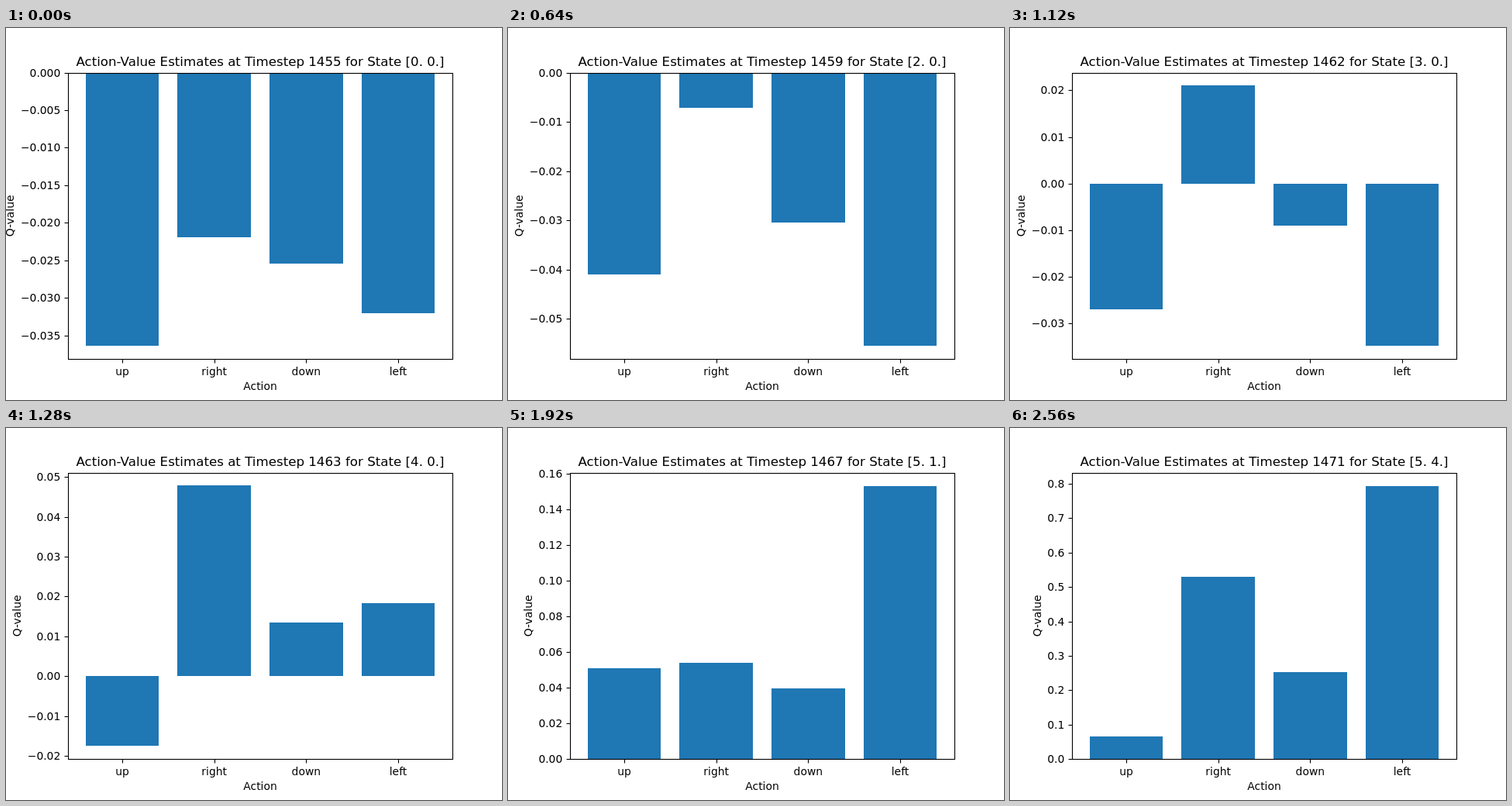
These frames come from a looping animation (640x480 px, 2.72 s). An HTML page with a canvas:

```html
<!DOCTYPE html>
<html lang="en">
<head>
<meta charset="utf-8">
<title>Action-value estimates</title>
<style>
  html, body { margin: 0; width: 100%; height: 100%; overflow: hidden; background: #fff; }
  canvas { display: block; }
</style>
</head>
<body>
<canvas id="stage" width="640" height="480"></canvas>
<script>
const ctx = document.getElementById('stage').getContext('2d');
const STEP_MS = 160;
const FIRST_TIMESTEP = 1455;
const ACTIONS = ['up', 'right', 'down', 'left'];
const AXES = { left: 80, right: 576, top: 57.6, bottom: 427.2 };
const HEIGHT = AXES.bottom - AXES.top;
const UNIT = (AXES.right - AXES.left) / 4.18; // four 0.8-wide bars plus 5% margins

// Each row: state, then the value of every action in thousandths.
const STEPS = [
  ['0. 0.', -36.34, -21.93, -25.44, -32.05],
  ['0. 0.', -35.46, -21.4, -24.8, -31.1],
  ['0. 0.', -34.96, -21.1, -24.3, -30.4],
  ['1. 0.', -36.2, -13.8, -26.6, -38.8],
  ['2. 0.', -40.98, -7.14, -30.43, -55.4],
  ['3. 0.', -30, 17, -11, -37.4],
  ['2. 0.', -35.35, -2.4, -27.24, -46],
  ['3. 0.', -27, 21, -9, -34.9],
  ['4. 0.', -17.5, 47.8, 13.4, 18.25],
  ['4. 1.', 28, 70.4, 26, 52],
  ['4. 1.', 25.6, 48.7, 24.1, 50.7],
  ['5. 1.', 48, 50, 37, 143.7],
  ['5. 1.', 50.9, 54, 39.6, 152.9],
  ['5. 2.', 55, 130, 80, 265],
  ['5. 2.', 58, 140, 85, 279],
  ['5. 3.', 70, 300, 155, 500],
  ['5. 4.', 65.5, 530, 251.6, 792.7]
];

function text(str, x, y, align = 'center', size = 13.889) {
  ctx.font = `${size}px "DejaVu Sans", sans-serif`;
  ctx.textAlign = align;
  ctx.fillText(str, x, y);
  return ctx.measureText(str).width;
}

function line(x1, y1, x2, y2) {
  ctx.beginPath();
  ctx.moveTo(x1, y1);
  ctx.lineTo(x2, y2);
  ctx.stroke();
}

// Smallest round step that gives at most nine intervals.
function tickStep(range) {
  const raw = range / 9;
  const power = 10 ** Math.floor(Math.log10(raw));
  return [1, 2, 2.5, 5, 10].find(m => m * power >= raw) * power;
}

// Bars rest on zero; only the sides they reach get a 5% margin.
function limits(values) {
  const low = Math.min(0, ...values);
  const high = Math.max(0, ...values);
  const pad = (high - low) * 0.05;
  return [low < 0 ? low - pad : 0, high > 0 ? high + pad : 0];
}

function drawBars(values, toY) {
  ctx.fillStyle = '#1f77b4';
  const zero = Math.round(toY(0));
  values.forEach((value, i) => {
    const left = AXES.left + (0.19 + i) * UNIT;
    const x = Math.round(left);
    ctx.fillRect(x, zero, Math.round(left + 0.8 * UNIT) - x, Math.round(toY(value)) - zero);
  });
}

function drawYTicks(low, high, toY) {
  const step = tickStep(high - low);
  const decimals = Math.ceil(-Math.log10(step) - 1e-6);
  let widest = 0;
  for (let n = Math.ceil(low / step - 1e-6); n * step <= high + step * 1e-6; n++) {
    const y = Math.round(toY(n * step));
    line(75.5, y + 0.5, 80.5, y + 0.5);
    const label = (n < 0 ? '\u2212' : '') + Math.abs(n * step).toFixed(decimals);
    widest = Math.max(widest, text(label, 70.28, y + 5, 'right'));
  }
  return widest;
}

function draw(index) {
  const [state, ...thousandths] = STEPS[index];
  const values = thousandths.map(v => v / 1000);
  const [low, high] = limits(values);
  const toY = v => AXES.bottom - (v - low) / (high - low) * HEIGHT;

  ctx.fillStyle = '#fff';
  ctx.fillRect(0, 0, 640, 480);
  drawBars(values, toY);

  ctx.fillStyle = ctx.strokeStyle = '#000';
  ctx.lineWidth = 1.11;
  ctx.strokeRect(80.5, 58.5, 496, 369);
  ACTIONS.forEach((action, i) => {
    const x = AXES.left + (0.59 + i) * UNIT;
    line(Math.round(x) + 0.5, 427.5, Math.round(x) + 0.5, 432.5);
    text(action, x, 448);
  });
  text('Action', 328, 467);
  text(`Action-Value Estimates at Timestep ${FIRST_TIMESTEP + index} for State [${state}]`,
    328, 49, 'center', 16.667);

  const labelWidth = drawYTicks(low, high, toY);
  ctx.save();
  ctx.translate(Math.round(61.7 - labelWidth), 242.4);
  ctx.rotate(-Math.PI / 2);
  text('Q-value', 0, 0);
  ctx.restore();
}

const start = performance.now();
function tick() {
  draw(Math.floor((performance.now() - start) / STEP_MS) % STEPS.length);
  requestAnimationFrame(tick);
}
tick();
</script>
</body>
</html>
```
